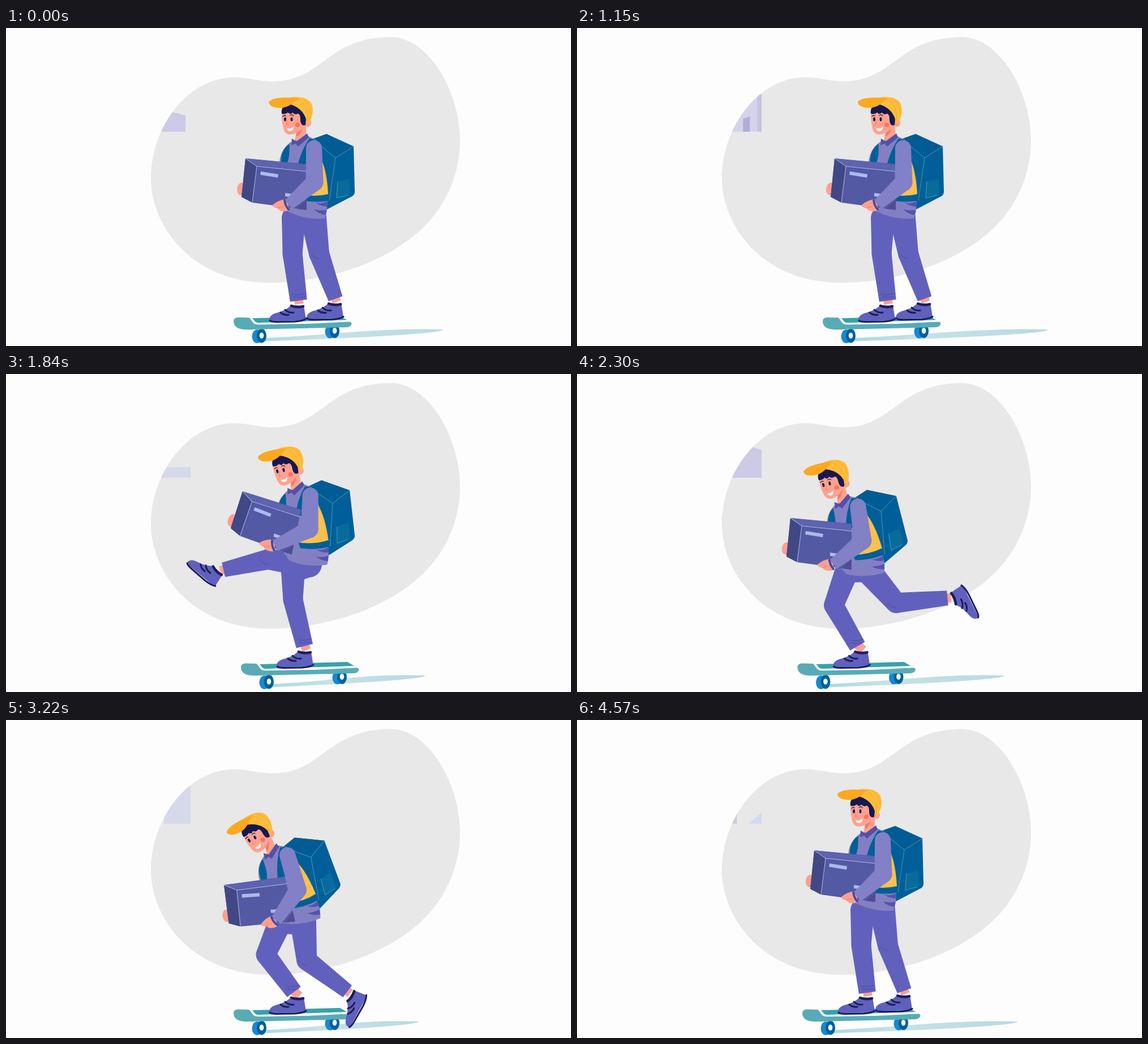
Recreate the animation shown at these times as an HTML page with a canvas. Size 998 by 561 pixels, loop 4670 ms.

```html
<!DOCTYPE html>
<html>
<head>
<meta charset="utf-8">
<title>Skateboard delivery</title>
<style>
html, body { margin: 0; width: 100%; height: 100%; overflow: hidden; background: #fdfdfd; }
canvas { display: block; }
</style>
</head>
<body>
<canvas id="stage" width="998" height="561"></canvas>
<script>
const LOOP = 4670, SCENERY_SPEED = 0.35;
const ctx = document.getElementById('stage').getContext('2d');
const blob = new Path2D('M680 16C746 16 802 112 802 198C802 268 768 338 698 383C638 424 548 449 468 449.5C322 449.5 256 343 256 266C256 172 324 87 402 87C430 87 445 94 471 94C560 94 566 16 680 16Z');

// time, board x, shadow tip x
const ride = [
  [0, 402, 772], [250, 407, 763], [560, 410, 777], [1150, 434, 832], [1360, 447, 851],
  [1840, 415, 740], [2300, 389.5, 755], [2600, 386, 761], [2900, 396, 736], [3220, 402, 728],
  [3600, 386, 768], [3910, 363, 750], [4250, 375, 757], [4570, 398, 778]
];

// body dx dy angle, head angle, box dx dy angle,
// standing hip knee ankle, pushing hip knee ankle, pushing foot angle
const stand = [0, 0, 0, 0, 0, 0, 0, 508, 335, 506, 398, 516, 475, 543, 335, 553, 398, 580, 472, 0];
const reach = [-10, 0, -5, -6, -18, -23, 12, 494, 348, 494, 398, 513, 474, 522, 336, 450, 327, 377, 344, 42];
const push = [-13, 13, -19, -8, -38, 61, -13, 484, 357, 459, 414, 505, 475, 525, 357, 531, 424, 598, 475, -59];
const trail = [-11.5, 14, -13, 0, -33.5, 24, 0, 489, 348, 466, 408, 505, 475, 525, 345, 576, 404, 661, 396, -115];
const poses = [
  [0, stand], [1300, stand], [1840, reach], [2110, push], [2300, trail],
  [2880, reach], [3220, push], [3450, trail], [3850, stand]
].map(([t, pose]) => [t, ...pose]);

// Buildings passing the small window: time in place, colour, outline
const scenery = [
  [0, '#cdcae8', 'M240 136L317 154V183H240Z'],
  [1150, '#d3d3e9', 'M250 110H326V183H250Z'],
  [1150, '#c5c3e0', 'M318 110H326V183H318Z'],
  [1150, '#b1aed6', 'M293 160L305 156V183H293Z'],
  [1840, '#d5daea', 'M255 164H345V183H255Z'],
  [2300, '#cccae5', 'M255 110L326 134V183H255Z'],
  [3220, '#d5d9ea', 'M279 110H345V183H279Z'],
  [3910, '#d6d7e9', 'M302 143L326 136L350 143V183H302Z'],
  [4570, '#d2daef', 'M303 183L326 163L345 147V183Z'],
  ...[320, 700, 1500, 2650, 2930, 3560, 4220].map((t, i) =>
    [t, i % 2 ? '#d4d8ec' : '#cccae5', `M280 ${120 + i * 17 % 40}L324 ${118 + i * 23 % 40}V183H280Z`])
].map(([t, color, d]) => [t, color, new Path2D(d)]);

// Smooth cyclic interpolation that never overshoots its keys
function sample(keys, t) {
  const n = keys.length;
  const key = (i, c) => keys[(i + n) % n][c] + (c ? 0 : Math.floor(i / n) * LOOP);
  let i = n - 1;
  while (keys[i][0] > t) i--;
  const slope = (k, c) => (key(k + 1, c) - key(k, c)) / (key(k + 1, 0) - key(k, 0));
  const tangent = (k, c) => {
    const a = slope(k - 1, c), b = slope(k, c);
    return a * b <= 0 ? 0 : 2 * a * b / (a + b);
  };
  const span = key(i + 1, 0) - key(i, 0), u = (t - key(i, 0)) / span, v = 1 - u;
  return keys[0].slice(1).map((_, j) => {
    const c = j + 1;
    return key(i, c) * v * v * (1 + 2 * u) + key(i + 1, c) * u * u * (3 - 2 * u) +
      span * u * v * (v * tangent(i, c) - u * tangent(i + 1, c));
  });
}

const turn = (px, py, dx, dy, angle) =>
  new DOMMatrix().translate(px + dx, py + dy).rotate(angle).translate(-px, -py);
const at = (m, x, y) => { const p = m.transformPoint(new DOMPoint(x, y)); return [p.x, p.y]; };

// Point a given distance beyond b on the line from a
function beyond(a, b, distance) {
  const len = Math.hypot(b[0] - a[0], b[1] - a[1]) || 1;
  return b.map((v, i) => v + (v - a[i]) / len * distance);
}

function fill(d, color) {
  ctx.fillStyle = color;
  ctx.fill(typeof d === 'string' ? new Path2D(d) : d);
}
function line(d, color, width = 1) {
  ctx.strokeStyle = color;
  ctx.lineWidth = width;
  ctx.stroke(new Path2D(d));
}
function oval(x, y, rx, ry, color, angle = 0) {
  ctx.fillStyle = color;
  ctx.beginPath();
  ctx.ellipse(x, y, rx, ry, angle, 0, 7);
  ctx.fill();
}

// Tapered limb through joints with the given half widths
function limb(joints, widths, color) {
  for (let i = 0; i < joints.length - 1; i++) {
    const [ax, ay] = joints[i], [bx, by] = joints[i + 1], a = widths[i], b = widths[i + 1];
    const len = Math.hypot(bx - ax, by - ay) || 1, nx = (ay - by) / len, ny = (bx - ax) / len;
    oval(ax, ay, a, a, color);
    fill(`M${ax + nx * a} ${ay + ny * a}L${bx + nx * b} ${by + ny * b}L${bx - nx * b} ${by - ny * b}L${ax - nx * a} ${ay - ny * a}Z`, color);
  }
}

function shoe(x, y, angle) {
  ctx.save();
  ctx.translate(x, y);
  ctx.rotate(angle * Math.PI / 180);
  fill('M-15 2L8 3Q10 14 12 28L-52 30C-55 21 -46 17 -38 15C-28 12 -20 8 -15 2Z', '#6060be');
  line('M-52 29Q-50 31.5 -40 31.5L-8 31Q6 30 12 26', '#1d1d58', 3);
  line('M-14 3Q-4 7 7 4', '#1d1d58', 4.5);
  line('M-33 15q6 5 14 4M-25 10q6 6 15 5', '#1d1d58', 3);
  ctx.restore();
}

function leg(hip, knee, ankle, foot, angle, widths) {
  limb([ankle, foot], [7.5, 8], '#fba090');
  shoe(...foot, angle);
  limb([hip, knee, beyond(knee, ankle, 6)], widths, '#6161bd');
}

function drawScenery(t) {
  fill(blob, '#e8e8e8');
  ctx.save();
  ctx.clip(blob);
  ctx.beginPath();
  ctx.rect(270, 117, 56, 66);
  ctx.clip();
  for (const [time, color, shape] of scenery) {
    const dt = (t - time + LOOP * 1.5) % LOOP - LOOP / 2;
    ctx.save();
    ctx.translate(dt * SCENERY_SPEED, 0);
    fill(shape, color);
    ctx.restore();
  }
  ctx.restore();
}

function wheel(x, y) {
  oval(x - 8, y + 1, 9, 12, '#1788d2');
  oval(x, y, 8.5, 12.5, '#00609c');
  oval(x, y - .5, 3.8, 5.2, '#fff');
}

function drawBoard(tip) {
  const shade = ctx.createLinearGradient(455, 0, tip, 0);
  shade.addColorStop(0, '#add8e3');
  shade.addColorStop(.35, '#c5e2e5');
  shade.addColorStop(1, '#b9d9e4');
  fill(`M455 547C560 543 ${tip - 110} 528 ${tip} 532C${tip + 2} 538 ${tip - 120} 546 455 552.5Z`, shade);
  wheel(451.5, 543);
  wheel(580.5, 534.5);
  fill('M410 510.5L430 511C435 517 436 523 444 523L606 518Q612 519 610 523Q608 528 600 528L430 532C410 533 402 527 402 517Q402 511 410 510.5Z', '#58abb6');
  fill('M434 512L590 508L602 515L446 520C438 520 439 514 434 512Z', '#37a2aa');
  line('M431 511C438 514 437 522 446 522L535 520.5L606 517', '#fff', 2.5);
}

function drawPack() {
  fill('M566 187L614 209L616 289Q616 294 611 297L567 320L560 300L550 215L541 196Z', '#005f98');
  fill('M541 196L566 187L614 209L582 229Z', '#005c94');
  line('M545 199L582 229L614 209M582 229L571 304', '#5c9fc4', .8);
  fill('M585 271L607 266V295L583 301Z', '#096b9c');
  line('M586 271L584 300L604 295', '#3f9cae');
  fill('M482 238L488 228L492 240Z', '#f9c14d');
}

function drawTorso() {
  fill('M503 201L532 190L547 197C558 220 562 245 560 292L568 300L567 322L563 336C540 338 515 333 497 323L484 300L483 238C484 222 490 211 503 201Z', '#8280c2');
  fill('M556 230C564 245 568 272 569 294Q545 301 518 296L540 250Z', '#f9c14d');
  fill('M516 293Q545 299 569 293L568 305Q545 309 518 303Z', '#005f98');
  fill('M546 307Q556 312 567 306L568 315Q555 315 546 307ZM544 320Q554 323 566 321L565 330Q552 328 544 320Z', '#5553ad');
  fill('M497 207C488 215 485 227 486 240L496 240C502 226 500 216 501 205Z', '#005f98');
  fill('M536 195L546 197Q534 214 529 246H514Q522 214 536 195Z', '#005f98');
}

function drawHead() {
  fill('M487 147C487 155 487 166 489 172C490 182 494 188 502 188Q508 188 513 185L510 197Q522 204 530 190V174C543 177 541 158 530 160L522 143Z', '#fda28f');
  fill('M513 185Q520 182 524 176Q520 190 512 192Z', '#f07c6c');
  fill('M487 151C485 140 494 132 505 132C522 132 531 145 530 160L529 171C523 174 520 168 520 162C520 155 519 153 516 151Q510 154 506 149Q503 154 498 149Q493 153 487 151Z', '#17184f');
  fill('M490 127C506 118 531 120 539 132C545 145 541 164 532 169C529 150 518 138 496 133Z', '#ffbd3a');
  fill('M464 130.5C469 123 490 121 517 124C509 131 498 141 485 141C473 141 464 137 464 130.5Z', '#fca91e');
  line('M516 124Q534 136 533 164M524 124Q538 133 539 151', '#eda536', .8);
  oval(493, 161, 2, 3.6, '#17184f');
  oval(504.5, 161, 2, 3.6, '#17184f');
  line('M489 156q3 -3 5 -1M502 154q4 -2 6 1', '#17184f', 1.2);
  line('M497 163l-2 7 4 1', '#ef7f70', 1.1);
  oval(515, 171, 4.2, 3.8, '#f6745f');
  fill('M496 177Q503 179 508 174Q508 182 502 182Q498 182 496 177Z', '#fff');
}

function drawBox() {
  oval(415, 284, 7, 11, '#fba090', .1);
  fill('M423 230L531 240V321L435 308L416 298Z', '#5359a3');
  fill('M423 230L531 241V253L443 244Z', '#5d63b1');
  fill('M423 230L443 244L435 308L416 298Z', '#414885');
  fill('M514 319L531 303V321Z', '#514d95');
  line('M423 230L443 244L531 253M443 244L435 308', '#b1b9e5');
  fill('M450 253L481 258L480 264L449 259Z', '#acb9ee');
  fill('M493 291L515 294V300L493 297Z', '#acb9ee');
}

function frame(t) {
  const [boardX, tip] = sample(ride, t), shift = boardX - 402;
  const [bx, by, bodyTurn, headTurn, cx, cy, boxTurn, ...legs] = sample(poses, t);
  const joint = i => [legs[i * 2], legs[i * 2 + 1]];
  const body = turn(567, 320, bx + shift, by, bodyTurn);
  const box = turn(423, 230, cx + shift, cy, boxTurn);

  ctx.setTransform(1, 0, 0, 1, 0, 0);
  fill('M0 0H998V561H0Z', '#fdfdfd');
  drawScenery(t);

  ctx.translate(shift, 0);
  drawBoard(tip - shift);
  const knee = joint(4), ankle = joint(5);
  leg(joint(3), knee, ankle, beyond(knee, ankle, 12), legs[12], [23, 18, 13]);
  leg(joint(0), joint(1), joint(2), [518, 487], 0, [21, 17.5, 15]);
  // Hips join the two legs under the jacket
  limb([joint(0), joint(3)], [20, 22], '#6161bd');
  const [kx, ky] = knee, [ax, ay] = joint(2);
  line(`M${kx - 14} ${ky + 1}q6 7 13 8M${ax - 11} ${ay - 6}q10 4 24 -1M${ax - 8} ${ay - 1}q10 3 20 0`, '#4b4ba6');

  ctx.setTransform(body);
  drawPack();
  drawTorso();
  ctx.setTransform(body.multiply(turn(522, 195, 0, 0, headTurn)));
  drawHead();
  ctx.setTransform(body);
  fill('M505 195L513 200L532 186L535 193L516 209L511 204L504 207Z', '#5251aa');

  ctx.setTransform(box);
  drawBox();
  fill('M497 302C486 302 478 306 470 313Q474 318 480 318Q484 326 500 322Z', '#fba090');
  line('M480 318Q485 315 490 315', '#ec7c6b');

  // The elbow follows the body and the box equally
  ctx.setTransform(1, 0, 0, 1, 0, 0);
  const held = at(box, 545, 272), elbow = at(body, 545, 272).map((v, i) => (v + held[i]) / 2);
  limb([at(body, 544, 212), elbow, at(box, 499, 312)], [14, 15.5, 10], '#8280c6');
  ctx.setTransform(box);
  line('M492 304Q493 313 499 320', '#4b4aa2', 4);
}

ctx.lineCap = ctx.lineJoin = 'round';
function tick() {
  frame(performance.now() % LOOP);
  requestAnimationFrame(tick);
}
tick();
</script>
</body>
</html>
```
